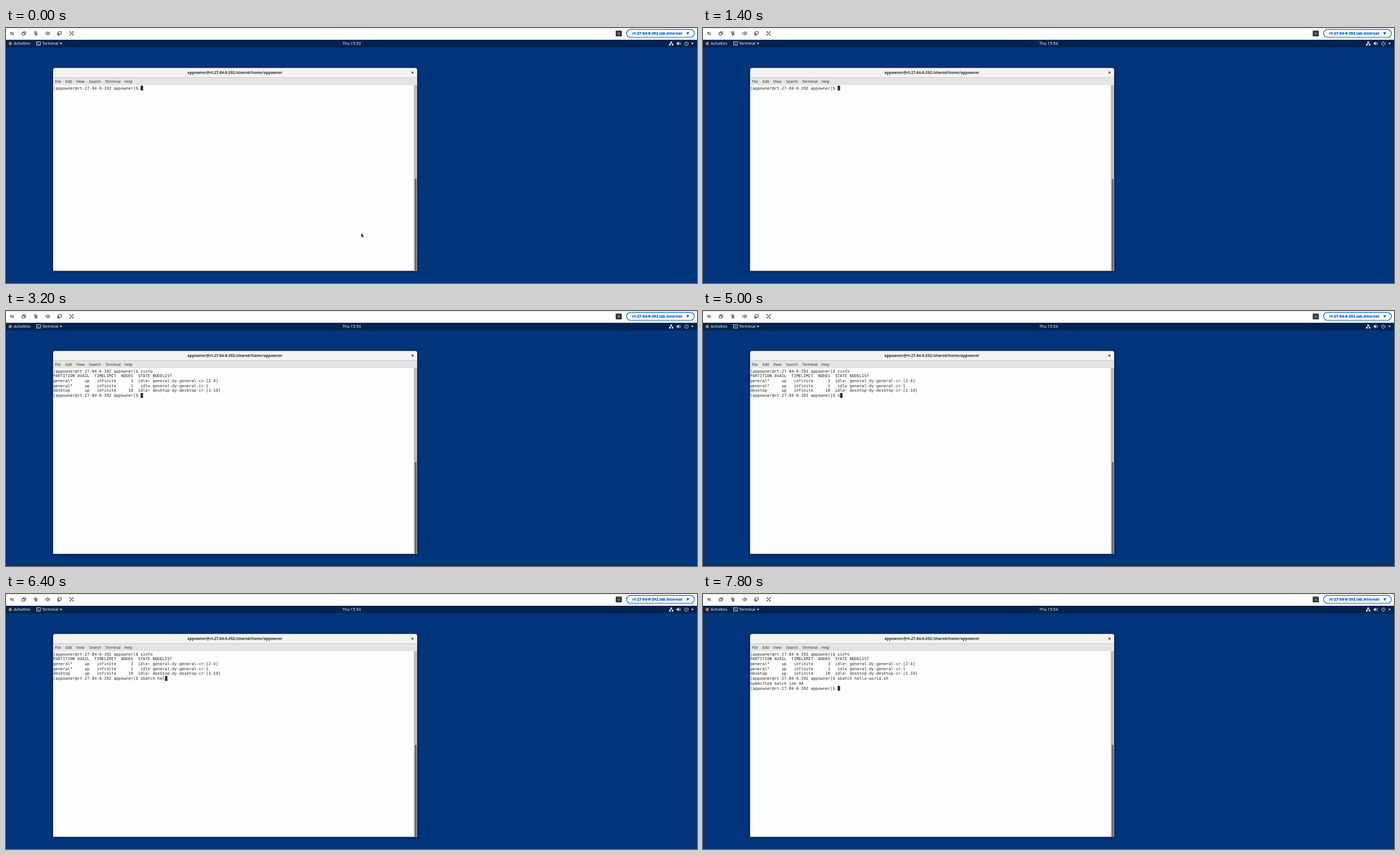
An HTML page with a canvas that plays this animation: 1232 by 455 pixels, repeating every 8 s.

```html
<!DOCTYPE html>
<html lang="en">
<head>
<meta charset="utf-8">
<title>Remote desktop terminal</title>
<style>
html, body { margin: 0; width: 100%; height: 100%; overflow: hidden; background: #02357c; }
canvas { display: block; }
</style>
</head>
<body>
<canvas id="stage" width="1232" height="455"></canvas>
<script>
const c = document.getElementById('stage').getContext('2d');
const LOOP = 8000;
const UI = '"Noto Sans", sans-serif';
const MONO = '"DejaVu Sans Mono", monospace';
const INK = '#222629';
const USER = 'appowner';
const HOST = 'rt-27-84-6-392';
const PROMPT = `[${USER}@${HOST} ${USER}]$ `;
const CELL = 4.335, ROW = 8.72;

const SINFO = [
  'PARTITION AVAIL  TIMELIMIT  NODES  STATE NODELIST',
  'general*     up   infinite      3  idle~ general-dy-general-cr-[2-4]',
  'general*     up   infinite      1   idle general-dy-general-cr-1',
  'desktop      up   infinite     10  idle~ desktop-dy-desktop-cr-[1-10]'
];
const FIRST = 'sinfo', SECOND = 'sbatch hello-world.sh ';
// [time, typed characters]
const TYPE_FIRST = [[0, 0], [1800, 2], [2200, 5]];
const TYPE_SECOND = [[3200, 0], [5000, 1], [5200, 3], [5400, 5], [5600, 7],
  [6000, 8], [6400, 10], [6600, 12], [7000, 22]];
const POINTER = [[0, [633.5, 366.5]], [600, [449, 326]], [800, [397, 304]], [1000, null]];

const at = (steps, t) => steps.filter(s => s[0] <= t).pop()[1];

function box(x, y, w, h, fill) {
  c.fillStyle = fill;
  c.fillRect(x, y, w, h);
}
function round(x, y, w, h, r, fill) {
  c.beginPath();
  c.roundRect(x, y, w, h, r);
  c.fillStyle = fill;
  c.fill();
}
function text(s, x, y, font, fill, align = 'left') {
  c.font = font;
  c.fillStyle = fill;
  c.textAlign = align;
  c.fillText(s, x, y);
}
function line(d, color, width = 0.9) {
  c.strokeStyle = color;
  c.lineWidth = width;
  c.stroke(new Path2D(d));
}
function shape(d, fill) {
  c.fillStyle = fill;
  c.fill(new Path2D(d));
}

function toolbar() {
  box(0, 0, 1232, 21, '#fefefe');
  box(0, 0, 1232, 1, '#dcdddd');
  // transfer arrows
  line('M9.2 12.4V7.6M12.4 7V11.8', INK);
  shape('M7.4 9.2L9.2 7L11 9.2ZM10.6 10.4L12.4 12.6L14.2 10.4Z', INK);
  // stacked windows
  line('M28.7 8.5H33.2V12.6H28.7ZM30.4 8.3V6.8H35V11H33.4', INK);
  // muted microphone
  line('M51.9 6.6V9.2A1.3 1.3 0 0 0 54.5 9.2V6.6ZM50.4 8.7C50.4 12 56 12 56 8.7M53.2 11.2V13M51.4 13H55M49.5 6.2L56.5 12.8', INK, 0.8);
  // speaker
  line('M70.7 8.4H72.2L74.6 6.4V12.8L72.2 10.8H70.7ZM75.7 8Q77 9.6 75.7 11.2M76.8 6.6Q79.2 9.6 76.8 12.6', INK, 0.8);
  // displays
  line('M93.3 6.7H98.8V10.9H93.3ZM92.9 8.8H92.1V12H95.3V11.2M92.2 13H95.6', INK);
  // full screen
  line('M114.3 7L119.5 12.2M119.5 7L114.3 12.2', INK);
  line('M113.8 8.6V6.5H115.9M117.9 6.5H120V8.6M120 10.7V12.8H117.9M115.9 12.8H113.8V10.7', INK, 0.8);

  round(1087, 4.5, 11, 10.5, 1.2, '#353d47');
  text('0', 1092.5, 12, '6px ' + UI, '#e4e7e9', 'center');
  c.beginPath();
  c.roundRect(1106.4, 2.7, 121, 13.8, 6.9);
  c.strokeStyle = '#0a63c4';
  c.lineWidth = 1.2;
  c.stroke();
  text(HOST + '.lab.internal', 1116.5, 12, '800 6.75px "Open Sans", sans-serif', '#0a63c4');
  shape('M1212.8 7.4H1218.4L1215.6 12.2Z', '#0a63c4');
}

function panel(t) {
  box(0, 21, 1232, 13.5, '#01234f');
  c.beginPath();
  c.arc(7.6, 27.7, 3, 0, 7);
  c.fillStyle = '#a98243';
  c.fill();
  const font = '7.1px ' + UI, white = '#f4f6f8';
  text('Activities', 13.8, 30.1, font, white);
  line('M54.5 24.5H61.5V30.6H54.5ZM56 26L57.4 27.3L56 28.6M58 29H60', white, 0.8);
  text('Terminal', 64.2, 30.1, font, white);
  shape('M95.8 26.5H100.2L98 29.2Z', white);
  text(t < 1400 ? 'Thu 15:53' : 'Thu 15:54', 616.2, 30.1, font, white, 'center');
  // network, volume, power
  shape('M1184.6 24.2H1187.4V26.8H1184.6ZM1182.2 28.6H1185V31.2H1182.2ZM1187 28.6H1189.8V31.2H1187Z', white);
  line('M1186 26.5V27.7M1183.6 29V27.7H1188.4V29', white, 0.7);
  shape('M1195.7 26.3H1197.2L1199.4 24.3V31L1197.2 29H1195.7Z', white);
  line('M1200.4 26.2Q1201.6 27.7 1200.4 29.2M1201.5 24.8Q1204 27.7 1201.5 30.6', white, 0.7);
  line('M1211.5 25.1A3.1 3.1 0 1 0 1214.9 25.1M1213.2 24V27.5', white);
  shape('M1221.8 26.5H1226L1223.9 29.2Z', white);
}

function windowFrame() {
  c.save();
  c.shadowColor = 'rgba(0,10,35,.6)';
  c.shadowBlur = 4;
  c.shadowOffsetY = 1;
  round(83.5, 70.8, 650, 363.3, [4, 4, 0, 0], '#17294a');
  c.restore();
  round(84, 71.2, 649, 18, [3.5, 3.5, 0, 0], '#f4f3f2');
  box(84, 88, 649, 1, '#c9c8c6');
  box(84, 89, 649, 13, '#e4e4e3');
  box(84, 102, 644, 331.3, '#fefefd');
  box(727.6, 102, 5.4, 331.3, '#bdbebb');
  box(727.2, 102, 0.6, 331.3, '#a9aaa7');
  round(728.8, 269.3, 3.3, 163.4, 1.2, '#666b6b');
  text(`${USER}@${HOST}:/shared/home/${USER}`, 408.2, 82, 'bold 6.65px ' + UI, '#2b3032', 'center');
  line('M723.1 77.9L726.4 81.2M726.4 77.9L723.1 81.2', '#2b3032', 1.1);
  const menu = { File: 87.3, Edit: 106, View: 125.3, Search: 148, Terminal: 177, Help: 211 };
  for (const name in menu) text(name, menu[name], 97.9, '6.7px ' + UI, '#303537');
}

function screen(t) {
  const rows = [PROMPT + FIRST.slice(0, at(TYPE_FIRST, t))];
  if (t >= 2600 && t < 3200) rows.push('');
  if (t >= 3200) rows.push(...SINFO, PROMPT + SECOND.slice(0, at(TYPE_SECOND, t)));
  if (t >= 7600) rows.push('Submitted batch job 44', PROMPT);
  return rows;
}

function terminal(t) {
  const rows = screen(t);
  rows.forEach((row, i) => text(row, 84, 109.6 + i * ROW, '7.2px ' + MONO, '#252a2c'));
  const last = rows.length - 1;
  box(84 + rows[last].length * CELL, 102.9 + last * ROW, CELL, 8.6, '#252a2c');
}

function pointer(t) {
  const p = at(POINTER, t);
  if (!p) return;
  c.save();
  c.translate(p[0], p[1]);
  const arrow = 'M0 0V6.2L1.4 5L2.5 7.6L3.6 7.1L2.5 4.6L4.4 4.4Z';
  line(arrow, '#fff', 0.8);
  shape(arrow, '#0b0b0b');
  c.restore();
}

function draw(now) {
  const t = now % LOOP;
  box(0, 0, 1232, 455, '#02357c');
  toolbar();
  panel(t);
  windowFrame();
  terminal(t);
  pointer(t);
}

const start = performance.now();
function tick() {
  draw(performance.now() - start);
  requestAnimationFrame(tick);
}
tick();
</script>
</body>
</html>
```
